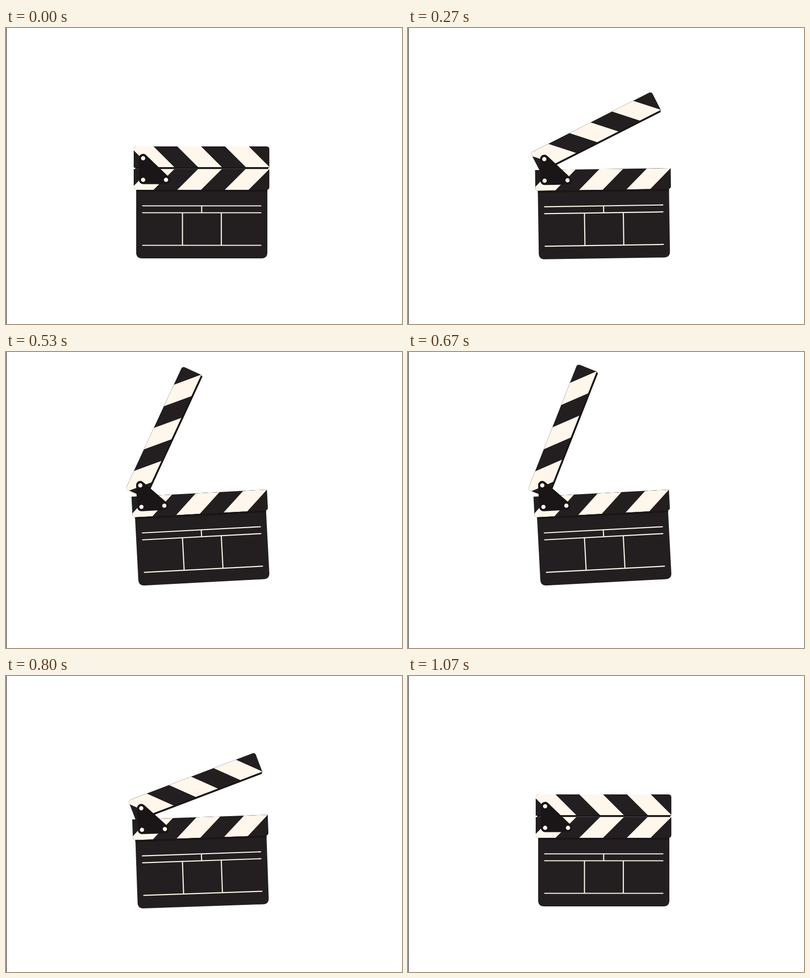
An HTML page for the animation above (1670 ms loop, 800 by 600 pixels).

```html
<!DOCTYPE html>
<html lang="en">
<head>
<meta charset="utf-8">
<title>Clapperboard</title>
<style>
  html, body { margin: 0; width: 100%; height: 100%; overflow: hidden; background: #fff; }
  svg { display: block; width: 800px; height: 600px; }
  .ink { fill: #231f20; }
  .dark { fill: #1a1617; }
  .cream { fill: #fff7ec; }
</style>
</head>
<body>
<svg viewBox="0 0 800 600">
  <defs>
    <path id="armShape" d="M258 283V246q0-6 6-6H526q6 0 6 6V283z"/>
    <path id="barShape" d="M258 286H532V322q0 6-6 6H264q-6 0-6-6z"/>
    <clipPath id="armClip"><use href="#armShape"/></clipPath>
    <clipPath id="barClip"><use href="#barShape"/></clipPath>
  </defs>
  <rect width="1" height="600"/>
  <g id="board">
    <path class="ink" d="M263 320H528V455q0 12-12 12H275q-12 0-12-12z"/>
    <rect class="dark" x="263" y="327" width="265" height="5"/>
    <path fill="none" stroke="#fff7ec" stroke-width="2.2" stroke-linecap="round"
      d="M276 360.5H515M276 374.5H515M276 440.5H515M395.3 361V374M356.5 375V440M435 375V440"/>
    <use href="#barShape" class="ink"/>
    <g clip-path="url(#barClip)">
      <path class="cream" d="M292 286h48l-42 42h-48zM388 286h48l-42 42h-48zM484 286h48l-42 42h-48z"/>
    </g>
    <g id="arm">
      <rect class="dark" x="261" y="281" width="269" height="4.6"/>
      <use href="#armShape" class="ink"/>
      <g clip-path="url(#armClip)">
        <path class="cream" d="M250 240h48l42 42h-48zM346 240h48l42 42h-48zM442.500 240h48l42 42h-48z"/>
      </g>
      <rect class="dark" x="261" y="282.300" width="269" height="3.200"/>
    </g>
    <path class="dark" stroke="#1a1617" stroke-width="17" stroke-linejoin="round" d="M277 263.500V308H323z"/>
    <g class="cream">
      <circle cx="277" cy="264" r="4.300"/>
      <circle cx="277" cy="307.700" r="4.300"/>
      <circle cx="323.300" cy="307.700" r="4.300"/>
    </g>
  </g>
</svg>
<script>
const LOOP = 1670, STEP = 200 / 3;
const board = document.getElementById('board');
const arm = document.getElementById('arm');

const progress = (t, from, to) => Math.min(1, Math.max(0, (t - from) / (to - from)));
const smooth = p => p * p * (3 - 2 * p);

// Quick start with a long settle: cubic-bezier(1/3, 0, 1/3, 1)
function settle(p) {
  let lo = 0, hi = 1;
  for (let i = 0; i < 24; i++) {
    const s = (lo + hi) / 2;
    if (s * (1 - s) + s ** 3 < p) lo = s; else hi = s;
  }
  return smooth(lo);
}

// The motion holds each pose for a fifteenth of a second, on 10 ms ticks
function heldTime(t) {
  let k = Math.floor((t + 4) / STEP);
  if (Math.round(k * STEP / 10) * 10 > t) k--;
  return k * STEP;
}

function draw(now) {
  const t = heldTime(now % LOOP);
  const open = 65.6 * (settle(progress(t, 67, 680)) - smooth(progress(t, 680, 866)));
  const tilt = -3 * smooth(progress(t, 120, 535))
    + 3.9 * smooth(progress(t, 733, 933))
    - 0.9 * smooth(progress(t, 933, 1066));
  board.setAttribute('transform', `rotate(${tilt} 395 376)`);
  arm.setAttribute('transform', `rotate(${-open} 277 264)`);
}

const start = performance.now();
function tick() {
  draw(performance.now() - start);
  requestAnimationFrame(tick);
}
tick();
</script>
</body>
</html>
```
